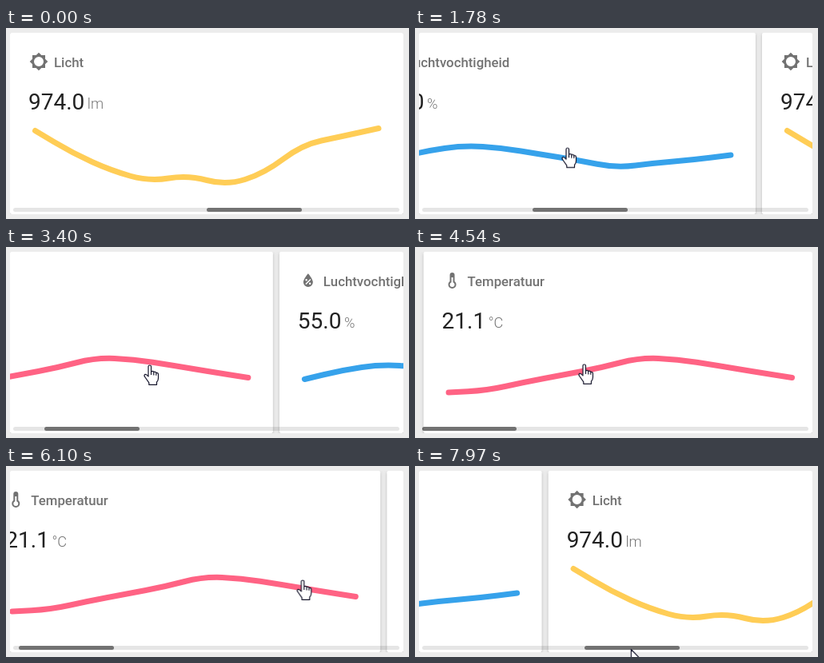
An HTML page for the animation above (8 s loop, 504 by 239 pixels).

```html
<!DOCTYPE html>
<html lang="nl">
<head>
<meta charset="utf-8">
<title>Sensorkaarten</title>
<style>
@property --pos { syntax: "<number>"; inherits: true; initial-value: 2; }

html, body { margin: 0; width: 100%; height: 100%; overflow: hidden; background: #ececec; }

#stage {
  position: relative; width: 504px; height: 239px; overflow: hidden;
  font-family: Roboto, sans-serif;
  animation: swipe 8s linear infinite;
}
#view { position: absolute; left: 5px; top: 6px; width: 492px; height: 227px; overflow: hidden; border-radius: 2px; }
#slides { position: absolute; inset: 0; transform: translateX(calc(var(--pos) * -500px)); }
.slide {
  position: absolute; top: 0; width: 492px; height: 227px; background: #fff; border-radius: 2px;
  box-shadow: 0 2px 2px rgba(0,0,0,.14), 0 1px 5px rgba(0,0,0,.12), 0 3px 1px -2px rgba(0,0,0,.2);
}
.slide svg { display: block; }
.icon, .name { fill: #727272; }
.name { font-size: 16.8px; font-weight: 500; }
.value { font-size: 28px; fill: #212121; }
.unit { font-size: 18.2px; font-weight: 300; fill: #757575; }
.line { fill: none; stroke-width: 7; stroke-linecap: round; stroke-linejoin: round; }

#track { position: absolute; left: 4px; top: 219px; width: 483px; height: 5px; border-radius: 5px; background: rgba(0,0,0,.1); }
#handle {
  position: absolute; height: 5px; border-radius: 5px; background: rgba(0,0,0,.5);
  left: calc(max(0, var(--pos)) * 121px);
  width: calc(119px + min(0, var(--pos)) * 98px);
}

#cursor { position: absolute; left: 0; top: 0; overflow: visible; animation: move 8s linear infinite; }
#cursor path { fill: #fff; stroke: #15152b; stroke-width: 1.2; stroke-linejoin: round; }
#hand { animation: hand 8s step-end infinite; }
#arrow { animation: arrow 8s step-end infinite; }

/* Drags are linear; each release settles with a 300 ms ease. */
@keyframes swipe {
  0%, 9.375% { --pos: 2; }
  10.4% { --pos: 1.88; animation-timing-function: ease; }
  14.15%, 20.375% { --pos: 1; }
  22.5% { --pos: 1.16; animation-timing-function: ease; }
  26.25%, 31.25% { --pos: 2; }
  32.5% { --pos: 1.87; animation-timing-function: ease; }
  36.25%, 40.25% { --pos: 1; }
  41.125% { --pos: .9; animation-timing-function: ease; }
  44.875%, 48.5% { --pos: 0; }
  50.625% { --pos: -.08; animation-timing-function: ease; }
  54.375%, 56.375% { --pos: 0; }
  58.75% { --pos: -.068; }
  67.625% { --pos: -.246; }
  68.375% { --pos: -.246; animation-timing-function: ease; }
  72.125%, 75.75% { --pos: 0; }
  77% { --pos: .14; animation-timing-function: ease; }
  80.75%, 84.625% { --pos: 1; }
  86.125% { --pos: 1.14; animation-timing-function: ease; }
  89.875%, 97.75% { --pos: 2; }
  98.125% { --pos: 1.87; }
  99.625% { --pos: 1.678; }
  100% { --pos: 1.64; }
}
@keyframes move {
  0%, 4.9% { transform: translate(192px, 242px); }
  5% { transform: translate(192px, 234px); }
  7.125%, 9.375% { transform: translate(173px, 154px); }
  10.4% { transform: translate(233px, 153.5px); }
  12.5% { transform: translate(251px, 153px); }
  18.5%, 20.375% { transform: translate(262px, 152px); }
  22.5% { transform: translate(182px, 150px); }
  30.125%, 31.25% { transform: translate(167px, 148.5px); }
  32.5% { transform: translate(230px, 148.5px); }
  38.375%, 40.25% { transform: translate(125px, 150px); }
  41.125% { transform: translate(175px, 148.5px); }
  42.5% { transform: translate(180px, 148px); }
  46.25%, 48.5% { transform: translate(178px, 148px); }
  50.625% { transform: translate(255px, 148px); }
  54.5%, 56.375% { transform: translate(202px, 147px); }
  67.625%, 68.375% { transform: translate(489.5px, 144px); }
  75.75% { transform: translate(400px, 143px); }
  77% { transform: translate(330px, 143px); }
  80.75%, 84.625% { transform: translate(318px, 143px); }
  86.125% { transform: translate(248px, 145px); }
  92.5%, 94.75% { transform: translate(298px, 229px); }
  95.875%, 97.75% { transform: translate(296px, 229px); }
  98.125% { transform: translate(294px, 229px); }
  99.625% { transform: translate(270px, 229px); }
  100% { transform: translate(264px, 229px); }
}
@keyframes hand {
  0%, 92.3%, 100% { opacity: 0; }
  5.2% { opacity: 1; }
}
@keyframes arrow {
  0%, 92.3%, 100% { opacity: 1; }
  5.2% { opacity: 0; }
}
</style>
</head>
<body>
<div id="stage">
  <div id="view">
    <div id="slides"></div>
    <div id="track"><div id="handle"></div></div>
  </div>
  <svg id="cursor" width="1" height="1">
    <g id="hand">
      <path d="M-2 14V1.5C-2-.5 1.5-.5 1.5 1.5V8Q3.5 6.8 4.8 8.4Q6.8 7.6 7.8 9.4Q10.5 9 10.5 11.5V16Q10.5 19 8.5 21V24.3H-1.2V21.8L-6 15Q-8 12.5-6.2 11.4Q-4.5 10.8-2 14Z"/>
      <path d="M1.5 8V12M4.8 8.6V12.4M7.8 9.6V12.8"/>
    </g>
    <path id="arrow" d="M.5 .5V17L4.3 13.3L7 19.6L9.5 18.5L6.8 12.3H12Z"/>
  </svg>
</div>
<script>
const STEP = 47.72;

const cards = [
  {
    name: 'Temperatuur', value: '21.1', unit: '°C', color: '#ff6384',
    levels: [182, 179.5, 169, 160, 151, 138.5, 140.5, 148, 156, 163.5],
    icon: 'M17,17A5,5 0 0,1 7,17C7,15.36 7.79,13.91 9,13V5A3,3 0 0,1 15,5V13C16.21,13.91 17,15.36 17,17M11,8V14.17C9.83,14.58 9,15.69 9,17A3,3 0 0,0 15,17C15,15.69 14.17,14.58 13,14.17V8Z'
  },
  {
    name: 'Luchtvochtigheid', value: '55.0', unit: '%', color: '#36a2eb',
    levels: [165.5, 154, 147, 150, 158, 165.5, 175, 169, 165, 159],
    icon: 'M12,3.25C12,3.25 6,10 6,14A6,6 0 0,0 18,14C18,10 12,3.25 12,3.25M14.47,9.97L15.53,11.03L9.53,17.03L8.47,15.97ZM9.75,10a1.25,1.25 0 0,1 0,2.5a1.25,1.25 0 0,1 0,-2.5M14.25,14.5a1.25,1.25 0 0,1 0,2.5a1.25,1.25 0 0,1 0,-2.5Z'
  },
  {
    name: 'Licht', value: '974.0', unit: 'lm', color: '#ffcd56',
    levels: [128.5, 157, 178.5, 192, 184, 197, 182, 146, 136, 125.5],
    icon: 'M12,18A6,6 0 0,1 12,6A6,6 0 0,1 12,18M20,15.31L23.31,12L20,8.69V4H15.31L12,.69L8.69,4H4V8.69L.69,12L4,15.31V20H8.69L12,23.31L15.31,20H20Z'
  }
];

// Quadratic smoothing through the midpoints of neighbouring levels.
function smoothLine(levels) {
  const points = levels.map((y, i) => [36.5 + i * STEP, y]);
  let d = `M${points[0]}`;
  for (let i = 1; i < points.length; i++) {
    const [ax, ay] = points[i - 1], [bx, by] = points[i];
    d += `Q${ax},${ay} ${(ax + bx) / 2},${(ay + by) / 2}`;
  }
  return `${d}L${points.at(-1)}`;
}

document.getElementById('slides').innerHTML = cards.map((card, i) => `
  <div class="slide" style="left:${i * 500}px">
    <svg width="492" height="227" viewBox="5 6 492 227">
      <path class="icon" fill-rule="evenodd" transform="translate(29 30)" d="${card.icon}"/>
      <text class="name" x="60" y="49">${card.name}</text>
      <text class="value" x="28" y="102">${card.value}<tspan class="unit" dx="3.5" dy="-1">${card.unit}</tspan></text>
      <path class="line" stroke="${card.color}" d="${smoothLine(card.levels)}"/>
    </svg>
  </div>`).join('');
</script>
</body>
</html>
```
